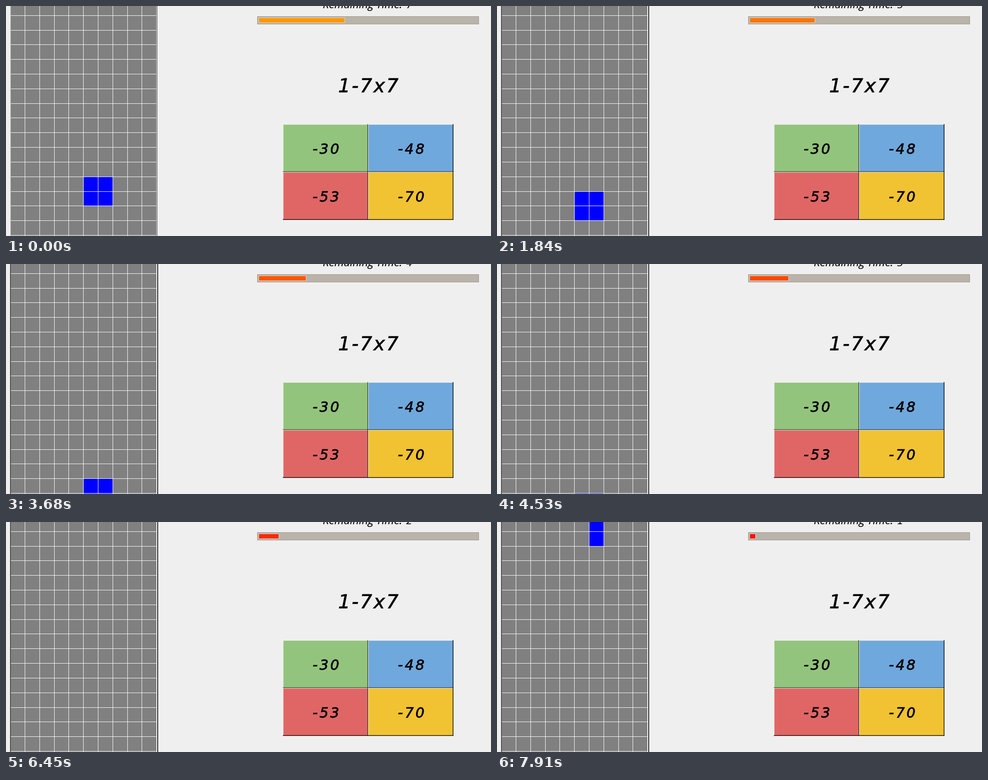
Recreate the animation shown at these times as an HTML page. Size 1087 px wide and 515 px high, loop 7.99 s.

```html
<!DOCTYPE html>
<html lang="en">
<head>
<meta charset="utf-8">
<title>Maths blocks</title>
<style>
html, body { margin: 0; width: 100%; height: 100%; overflow: hidden; background: #efefef; }
svg { display: block; width: 1087px; height: 515px; }
rect { shape-rendering: crispEdges; }
.soft { shape-rendering: geometricPrecision; }
text { font-family: "DejaVu Sans", sans-serif; font-style: italic; fill: #000; stroke: #000; }
.sum { font-size: 43px; letter-spacing: 3px; stroke-width: .8px; }
.answer { font-size: 31.5px; letter-spacing: 4px; stroke-width: .9px; }
.timer { font-family: "Open Sans", "Noto Sans", sans-serif; font-size: 24px; letter-spacing: .2px; stroke-width: .2px; }
.digit { font-size: 22px; stroke-width: 0; }
</style>
</head>
<body>
<svg id="stage" viewBox="0 0 1087 515"></svg>
<script>
const LOOP = 7990;
const PITCH = 32.82, COLS = 10, ROWS = 16;
const stage = document.getElementById('stage');

function add(tag, attrs, content = '') {
  const el = document.createElementNS('http://www.w3.org/2000/svg', tag);
  set(el, attrs);
  el.textContent = content;
  stage.appendChild(el);
  return el;
}
function set(el, attrs) {
  for (const key in attrs) el.setAttribute(key, attrs[key]);
}
const rect = (x, y, width, height, fill, cls = '') =>
  add('rect', { x, y, width, height, fill, class: cls });
const label = (cls, x, y, content, anchor = 'middle') =>
  add('text', { class: cls, x, y, 'text-anchor': anchor }, content);

// Grid line before column c / above row r; row 0 starts just above the stage
const lineX = c => Math.floor(9.55 + PITCH * c);
const lineY = r => Math.floor(21.2 + PITCH * (r - 1));

// Board
rect(0, 0, 1087, 515, '#efefef');
const leftEdge = rect(9, 0, 2, 515, '#505050');
rect(11, 0, 327, 515, '#808080');
const rightEdge = rect(338, 0, 1, 515, '#202020');

const cells = [0, 1, 2, 3].map(() => rect(0, 0, 0, 0, '#0000ff'));

for (let c = 1; c <= COLS; c++) rect(lineX(c), 0, 1, 515, '#ffffff');
for (let r = 1; r <= ROWS; r++) rect(11, lineY(r), 327, 1, '#ffffff');

// Timer
label('timer', 710, 5, 'Remaining Time:', 'start');
const digit = label('digit', 904, 5, '7');
rect(563, 23, 497, 18, '#9d968d');
rect(564, 24, 495, 16, '#bab3aa');
const barRim = rect(566, 26, 194, 12, '#e2dbd0');
const bar = rect(567, 27, 192, 10, '#ff9900');

// Question and answers
label('sum', 813.5, 193, '1-7x7');

function button(x, y, fill, content) {
  rect(x, y, 191, 107, fill);
  rect(x - 0.5, y - 0.5, 190, 1.2, '#f4f4ec', 'soft');
  rect(x - 0.5, y - 0.5, 1.2, 106, '#f4f4ec', 'soft');
  rect(x + 189.2, y - 0.5, 1.5, 107.4, '#101010', 'soft');
  rect(x - 0.5, y + 105.4, 191.2, 1.5, '#101010', 'soft');
  label('answer', x + 98, y + 66, content);
}
button(621, 265, '#93c47d', '-30');
button(812, 265, '#6fa8dc', '-48');
button(621, 372, '#e06666', '-53');
button(812, 372, '#f1c232', '-70');

const TICKS = [100, 1460, 2820, 4300, 5700, 7100];
const DROPS = [1300, 2170, 3040, 3910, 4780];
const SPAWN = 6920, SPAWN_DROP = 7790, FOCUS = 1300;

const passed = (times, t) => times.filter(at => t >= at).length;

function placeCell(el, col, row) {
  const x = lineX(col) + 1, y = lineY(row) + 1;
  set(el, { x, y, width: lineX(col + 1) - x, height: lineY(row + 1) - y });
}

function draw(t) {
  const end = t < 70 ? 760 : Math.round(735 - (t - 840) * 0.02192);
  const width = end - 566;
  barRim.setAttribute('width', width);
  set(bar, { width: width - 2, fill: `rgb(255,${Math.round(width * 0.75 + 6)},0)` });
  digit.textContent = 7 - passed(TICKS, t);

  const focused = t >= FOCUS;
  set(leftEdge, { x: focused ? 9 : 10, width: focused ? 2 : 1, fill: focused ? '#505050' : '#a0a0a0' });
  set(rightEdge, { x: focused ? 339 : 338, width: focused ? 2 : 1 });

  const fresh = t >= SPAWN;
  const row = fresh ? (t >= SPAWN_DROP ? 1 : 0) : 12 + passed(DROPS, t);
  cells.forEach((el, i) => {
    if (fresh) placeCell(el, 6, row - i);
    else placeCell(el, 5 + i % 2, row + (i >> 1));
  });
}

function tick() {
  draw(performance.now() % LOOP);
  requestAnimationFrame(tick);
}
tick();
</script>
</body>
</html>
```
